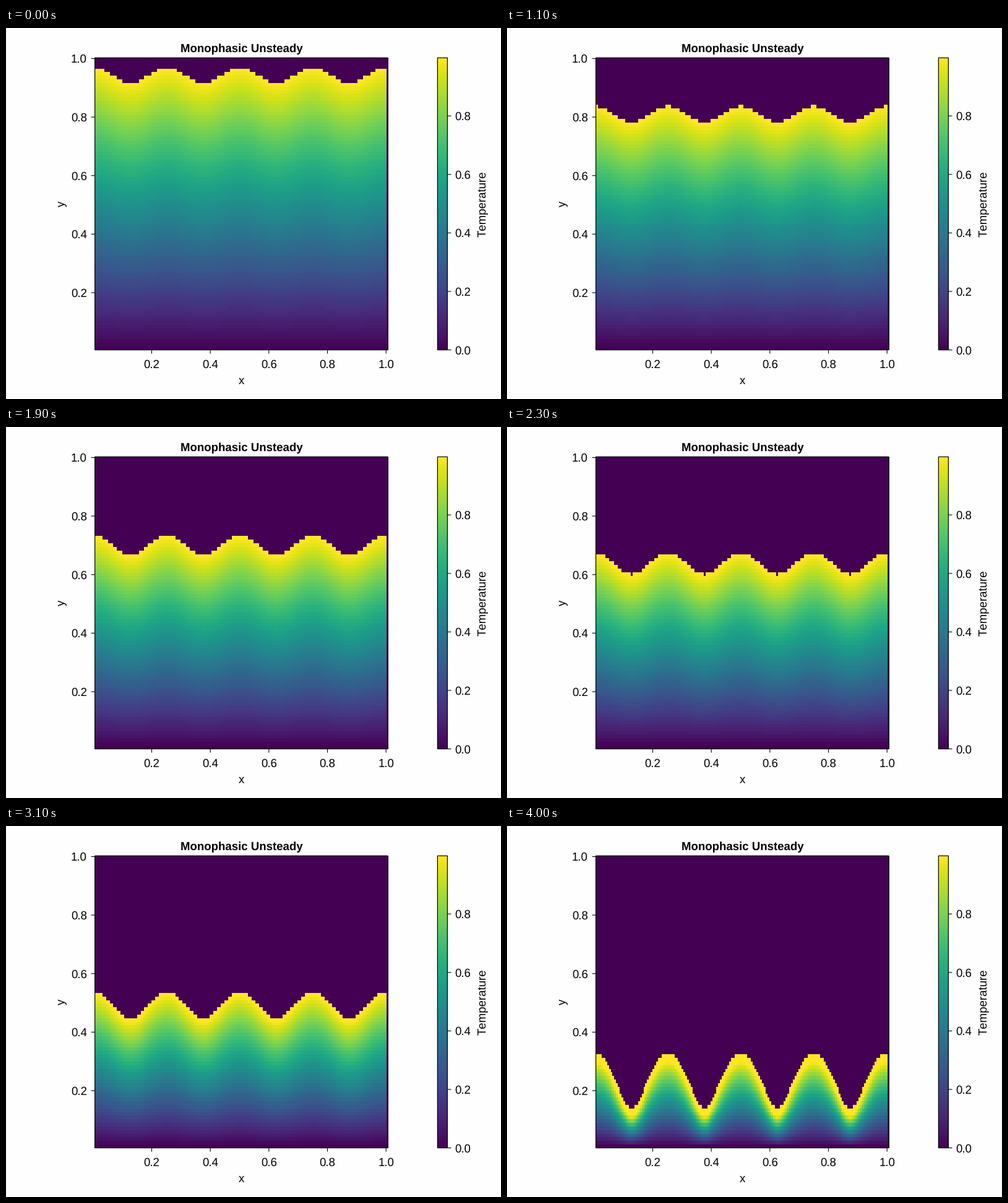
Animation of 800x600 px, one loop 4100 ms. Source, as a matplotlib script:

```python
import numpy as np
import matplotlib.pyplot as plt
from matplotlib.animation import FuncAnimation
from matplotlib.patches import Rectangle

FRAMES, INTERVAL = 41, 100
COLS, ROWS = 161, 81
LEFT, RIGHT, TOP, BOTTOM = 143.6, 616.8, 48.2, 520.6
BAR_LEFT, BAR_RIGHT = 697.4, 713.4
PT = 0.72  # points per pixel at 100 dpi

# Squared front height (in rows) and its ripple, at a few times
TIMES = [0, 7, 15, 23, 31, 35, 40]
LEVEL = [5798, 4805, 3742, 2658, 1582, 1072, 404]
RIPPLE = [310, 295, 287, 306, 295, 305, 283]

plt.rcParams["font.family"] = "Liberation Sans"
plt.rcParams["text.hinting"] = "none"
plt.rcParams["text.kerning_factor"] = 6

fig = plt.figure(figsize=(8, 6), dpi=100, facecolor="#fefefe")
ax = fig.add_axes([0, 0, 1, 1])


def temperature(frame):
    level = np.interp(frame, TIMES, LEVEL)
    ripple = np.interp(frame, TIMES, RIPPLE)
    phase = 2 * np.pi * (np.arange(COLS) + 1) / 40
    front = np.sqrt(level + ripple * np.cos(phase))
    # The heat runs ahead of the visible front by about one step
    hot = front - 55 / np.sqrt(level)
    row = np.arange(ROWS)[:, None]
    u = np.clip(row / hot, 0, 1)
    field = (12 * u + u**3) / 13
    field[row + 0.5 > front] = 0
    field[:, -1] = 0
    return field


def line(xs, ys):
    ax.plot(xs, ys, color="black", lw=1.1 * PT, solid_capstyle="butt",
            snap=False, zorder=4)


def label(x, y, text, ha="center", **kw):
    ax.text(x, y, text, fontsize=18.67 * PT, ha=ha, va="baseline",
            rotation_mode="anchor", color="black", **kw)


def box(x0, x1):
    ax.add_patch(Rectangle((x0, TOP), x1 - x0, BOTTOM - TOP, fill=False,
                           ec="black", lw=1.2 * PT, snap=False, zorder=5))


style = dict(cmap="viridis", vmin=0, vmax=1, origin="lower", aspect="auto",
             interpolation="nearest")
heat = ax.imshow(temperature(0), extent=(LEFT, RIGHT, BOTTOM, TOP), **style)
ax.imshow(np.linspace(0, 1, 256)[:, None],
          extent=(BAR_LEFT, BAR_RIGHT, BOTTOM, TOP), **style)
box(LEFT, RIGHT)
box(BAR_LEFT, BAR_RIGHT)

for k in range(1, 6):
    name = f"{k / 5:.1f}"
    x = 140.8 + 94.68 * k
    y = 522.7 - 94.66 * k
    line([x, x], [BOTTOM, BOTTOM + 6])
    label(x, 550, name)
    line([LEFT - 6, LEFT], [y, y])
    label(130.7, y + 6.7, name, ha="right")

for k in range(5):
    y = BOTTOM - 94.6 * k
    line([BAR_RIGHT, BAR_RIGHT + 6], [y, y])
    label(725, y + 6.9, f"{k / 5:.1f}", ha="left")

label(380.7, 38.7, "Monophasic Unsteady", weight="bold")
label(380.5, 575.5, "x")
label(94.5, 284.5, "y", rotation=90)
label(775.8, 284.7, "Temperature", rotation=90)

ax.set_xlim(0, 800)
ax.set_ylim(600, 0)
ax.axis("off")


def update(frame):
    heat.set_data(temperature(frame))
    return [heat]


anim = FuncAnimation(fig, update, frames=FRAMES, interval=INTERVAL, repeat=True)
plt.show()
```
